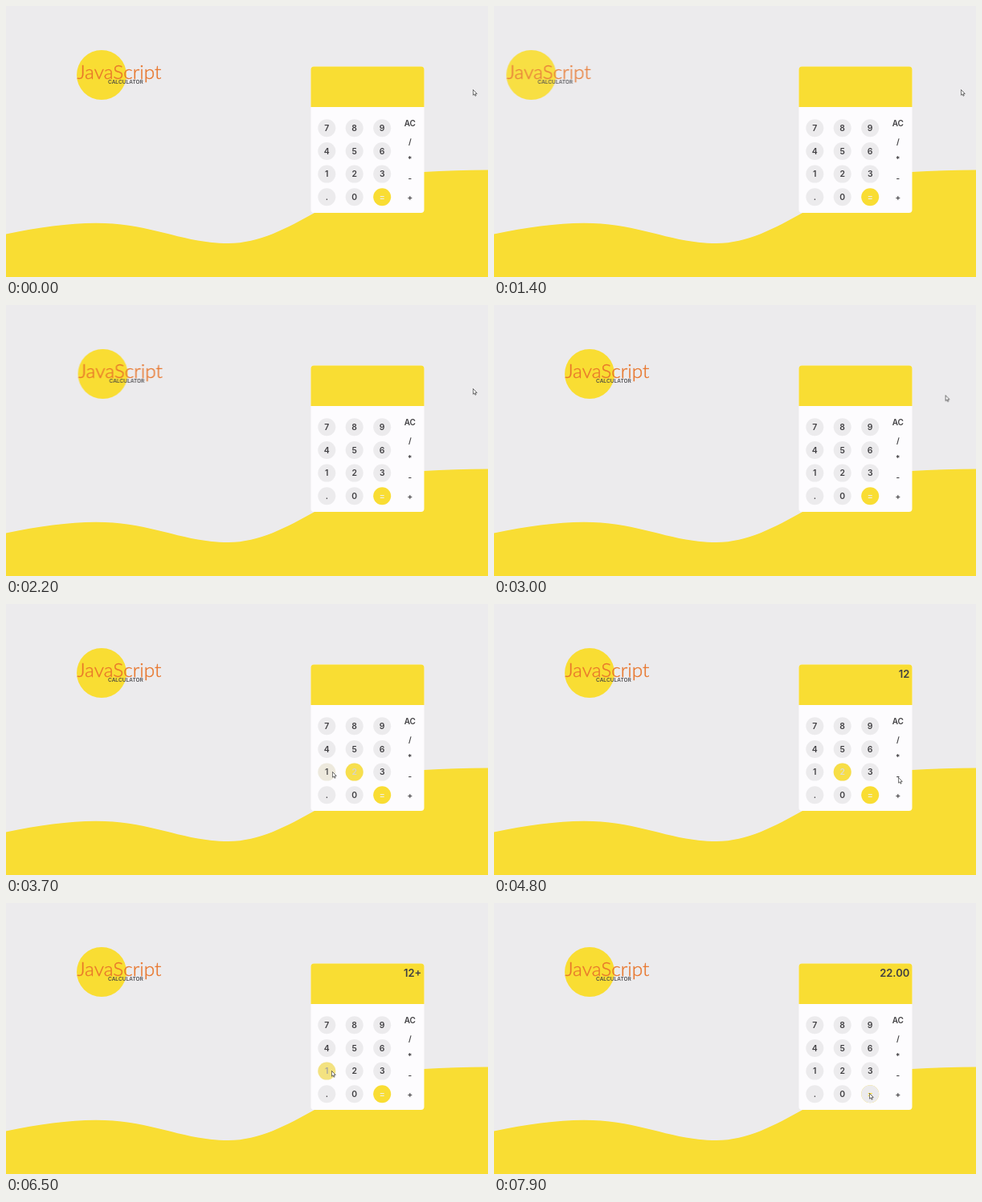
Recreate the animation shown at these times as an HTML page. Size 600x338 px, loop 8000 ms.

```html
<!DOCTYPE html>
<html lang="en">
<head>
<meta charset="utf-8">
<title>JavaScript Calculator</title>
<style>
  :root { --sun: #f9dd33; --mist: #ecebed; --ink: #403f42; }
  html, body { margin: 0; width: 100%; height: 100%; overflow: hidden; background: var(--mist); }
  body > svg { display: block; width: 100vw; height: 100vh; overflow: hidden; }
  text { font-family: Inter, "Open Sans", sans-serif; font-weight: 600; fill: var(--ink); }
  .sun { fill: var(--sun); }
  .mist { fill: var(--mist); }
  .body { fill: #fdfcfe; }
  .keys text, .ops text { font-size: 10.4px; text-anchor: middle; }
  .ops text { font-size: 10px; }
  .keys .pale { fill: #f1eee0; }
  .keys .gold { fill: var(--sun); }
  .name { font: 300 24.4px Lato, "Open Sans", sans-serif; fill: #e8752b; stroke: #e8752b; stroke-width: .35px; }
  .sub { font-size: 6.6px; font-weight: 500; }
  .roll text { font-size: 13px; text-anchor: end; }

  .logo, .hot, .roll, .mouse { animation: 8s linear infinite; }
  .logo { animation-name: bounce; animation-timing-function: cubic-bezier(.215, .61, .355, 1); }
  .roll { animation-name: roll; animation-timing-function: step-end; }
  .mouse { animation-name: mouse; animation-timing-function: ease-in-out; }
  .hot { opacity: 0; }
  .one { animation-name: one; }
  .two { animation-name: two; }
  .zero { animation-name: zero; }
  .equal { animation-name: equal; }

  @keyframes bounce {
    0%, 11.09% { transform: none; opacity: 1; }
    11.1% { transform: translateX(-937.5px); opacity: 0; }
    22.35% { transform: translateX(7.8px); opacity: 1; }
    25.16% { transform: translateX(-3.1px); }
    27.98% { transform: translateX(1.6px); }
    29.85%, 100% { transform: none; opacity: 1; }
  }
  @keyframes roll {
    0% { transform: none; }
    48.7% { transform: translateY(-50px); }
    54.9% { transform: translateY(-100px); }
    66.2% { transform: translateY(-150px); }
    83.7% { transform: translateY(-200px); }
    89.9% { transform: translateY(-250px); }
    95.6%, 100% { transform: translateY(-300px); }
  }
  @keyframes mouse {
    0%, 36% { transform: translate(581px, 104px); animation-timing-function: ease-in; }
    37.5% { transform: translate(562px, 112px); animation-timing-function: linear; }
    41.25% { transform: translate(442px, 202px); animation-timing-function: ease-out; }
    43.75% { transform: translate(428px, 210px); }
    46.25%, 51.9% { transform: translate(406px, 209px); }
    53.5%, 57.8% { transform: translate(432px, 211px); }
    60% { transform: translate(503px, 216px); }
    62%, 71.9% { transform: translate(503px, 238px); }
    78.75% { transform: translate(408px, 210px); }
    81.25%, 85.6% { transform: translate(405px, 209px); }
    87.5%, 91.2% { transform: translate(432px, 237px); }
    93.1%, 100% { transform: translate(467px, 237px); }
  }
  @keyframes one {
    0%, 45.3% { opacity: 0; }
    46.25% { opacity: .08; }
    50%, 52.2% { opacity: 1; }
    57%, 78.4% { opacity: 0; }
    81.25% { opacity: .58; }
    83.7%, 86.2% { opacity: 1; }
    91.2%, 100% { opacity: 0; }
  }
  @keyframes two {
    0%, 40.6% { opacity: 0; }
    44.4%, 45.3% { opacity: 1; }
    46.25% { opacity: .86; }
    50%, 52.5% { opacity: 0; }
    56.2%, 59% { opacity: 1; }
    60% { opacity: .9; }
    64.4%, 100% { opacity: 0; }
  }
  @keyframes zero {
    0%, 86.9% { opacity: 0; }
    90.6%, 91.8% { opacity: 1; }
    96.5%, 100% { opacity: 0; }
  }
  @keyframes equal {
    0%, 92.5% { opacity: 0; }
    97.5%, 100% { opacity: 1; }
  }
</style>
</head>
<body>
<svg viewBox="0 0 600 338" preserveAspectRatio="none">
  <defs><circle id="dot" r="11"/></defs>
  <rect class="mist" width="600" height="338"/>
  <path class="sun" d="M0 284.5C40 276 78 270.7 112 270.7C180 270.7 220 296 277 296C315 296 350 277 384 258C430 232 462 211 520 207Q558 204.5 600 204.5V338H0Z"/>

  <g class="logo">
    <circle class="sun" cx="119" cy="86" r="31"/>
    <text class="name" x="88.5" y="91.3">JavaScript</text>
    <text class="sub" x="127" y="97.4">CALCULATOR</text>
  </g>

  <rect class="body" x="379.5" y="75.5" width="141" height="182.5" rx="4"/>
  <path class="sun" d="M379.5 126V79.5a4 4 0 0 1 4-4h133a4 4 0 0 1 4 4V126Z"/>
  <svg x="380" y="76" width="140" height="50">
    <g class="roll">
      <text x="137.3" y="65.5">1</text>
      <text x="137.3" y="115.5">12</text>
      <text x="137.3" y="165.5">12+</text>
      <text x="137.3" y="215.5">12+1</text>
      <text x="137.3" y="265.5">12+10</text>
      <text x="137.3" y="315.5">22.00</text>
    </g>
  </svg>

  <g class="keys">
    <g class="mist">
      <use href="#dot" x="399.3" y="152.3"/><use href="#dot" x="433.7" y="152.3"/><use href="#dot" x="468.2" y="152.3"/>
      <use href="#dot" x="399.3" y="181"/><use href="#dot" x="433.7" y="181"/><use href="#dot" x="468.2" y="181"/>
      <use href="#dot" x="399.3" y="209.6"/><use href="#dot" x="433.7" y="209.6"/><use href="#dot" x="468.2" y="209.6"/>
      <use href="#dot" x="399.3" y="238.2"/><use href="#dot" x="433.7" y="238.2"/>
    </g>
    <use class="sun" href="#dot" x="468.2" y="238.2"/>
    <text x="399.3 433.7 468.2" y="156.1">789</text>
    <text x="399.3 433.7 468.2" y="184.8">456</text>
    <text x="399.3 433.7 468.2" y="213.4">123</text>
    <text x="399.3 433.7" y="242">.0</text>
    <text class="pale" x="468.2" y="242">=</text>

    <g class="hot one"><use class="sun" href="#dot" x="399.3" y="209.6"/><text class="pale" x="399.3" y="213.4">1</text></g>
    <g class="hot two"><use class="sun" href="#dot" x="433.7" y="209.6"/><text class="pale" x="433.7" y="213.4">2</text></g>
    <g class="hot zero"><use class="sun" href="#dot" x="433.7" y="238.2"/><text class="pale" x="433.7" y="242">0</text></g>
    <g class="hot equal"><use class="mist" href="#dot" x="468.2" y="238.2"/><text class="gold" x="468.2" y="242">=</text></g>
  </g>

  <g class="ops">
    <text x="502.8" y="150">AC</text>
    <text x="502.8" y="172.6">/</text>
    <text x="502.8" y="195.4">*</text>
    <text x="502.8" y="218.6">-</text>
    <text x="502.8" y="242">+</text>
  </g>

  <g class="mouse">
    <path d="M.4 .4V7.2L2 5.8L3 8.2L4.2 7.7L3.2 5.4H5.3Z" fill="#fff" stroke="#333" stroke-width=".7" stroke-linejoin="round"/>
  </g>
</svg>
</body>
</html>
```
